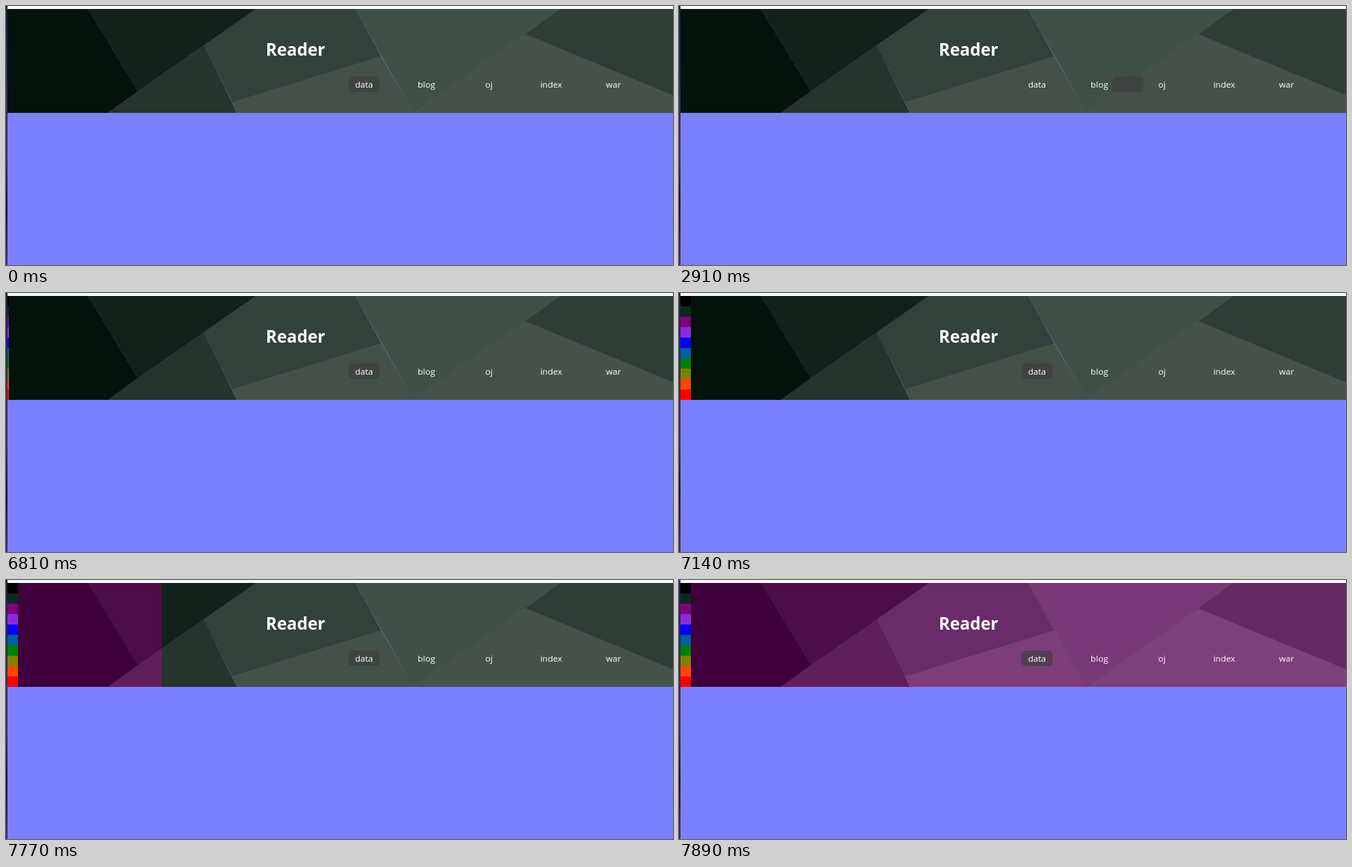
An HTML page for the animation above (8000 ms loop, 896x349 px).

```html
<!DOCTYPE html>
<html lang="en">
<head>
<meta charset="utf-8">
<title>Reader</title>
<style>
  html, body { margin: 0; width: 100%; height: 100%; overflow: hidden; background: #7b80ff; }
  svg { display: block; }
  text { fill: #fff; font-family: "Open Sans", "Noto Sans", sans-serif; }
  .title { font-size: 22.6px; font-weight: 700; }
  .nav { font-size: 11.6px; text-anchor: middle; }
</style>
</head>
<body>
<svg id="stage" width="896" height="349" viewBox="0 0 896 349">
  <defs>
    <linearGradient id="edge" x2="0" y2="1">
      <stop offset="0" stop-color="#182048"/>
      <stop offset=".4" stop-color="#3a2c56"/>
      <stop offset=".6" stop-color="#35305f"/>
      <stop offset=".77" stop-color="#17152c"/>
      <stop offset="1" stop-color="#3c3468"/>
    </linearGradient>
    <clipPath id="header"><rect x="2" y="4" width="894" height="140"/></clipPath>
    <clipPath id="sweep"><rect id="wipe" x="2" y="4" width="0" height="140"/></clipPath>
  </defs>
  <rect width="896" height="349" fill="#7b80ff"/>
  <rect id="top" width="896" height="4" fill="#f5fff8"/>
  <g clip-path="url(#header)"><g id="green"></g></g>
  <g clip-path="url(#sweep)"><g id="purple"></g></g>
  <rect id="pill" y="95" width="42" height="21" rx="6" fill="rgba(62,62,62,.67)"/>
  <text class="title" x="349" y="67">Reader</text>
  <g id="links"></g>
  <g id="swatches"></g>
  <rect width="2" height="349" fill="url(#edge)"/>
</svg>
<script>
const $ = id => document.getElementById(id);

function add(parent, tag, attrs, text = '') {
  const el = document.createElementNS('http://www.w3.org/2000/svg', tag);
  for (const key in attrs) el.setAttribute(key, attrs[key]);
  el.textContent = text;
  parent.append(el);
  return el;
}

// outline, green colour, purple colour
const facets = [
  ['2,4 110,4 177,115 137,144 2,144', '#03120b', '#3f003d'],
  ['110,4 336,4 177,115', '#12211a', '#4c0d4a'],
  ['177,115 266,53 310,144 137,144', '#25342c', '#5e1f5c'],
  ['266,53 336,4 469,4 504,68 304,130', '#32423a', '#6a2c69'],
  ['304,130 504,68 548,144 310,144', '#435149', '#7d3d7b'],
  ['469,4 745,4 698,38 548,144', '#3f5047', '#793878'],
  ['698,38 896,120 896,144 548,144', '#445249', '#7e3f7d'],
  ['745,4 896,4 896,120 698,38', '#2e3d35', '#672966']
];
for (const [points, green, purple] of facets) {
  add($('green'), 'polygon', { points, fill: green, stroke: green, 'stroke-width': .5 });
  add($('purple'), 'polygon', { points, fill: purple, stroke: purple, 'stroke-width': .5 });
}

['data', 'blog', 'oj', 'index', 'war'].forEach((word, i) =>
  add($('links'), 'text', { class: 'nav', x: 481 + i * 83.8, y: 110 }, word));

const colours = ['#000', '#0c2820', '#800080', '#8a2be2', '#00f',
  '#005fa0', '#008000', '#808000', '#ff4500', '#f00'];
const swatches = colours.map((fill, i) =>
  add($('swatches'), 'rect', { x: 2, y: 4 + i * 14, width: 0, height: 14, fill }));

const LOOP = 8000, TICK = 30;
const easeOut = p => 1 - (1 - p) ** 1.7;
const linear = p => p;

// each step: start, end, value at start, value at end, easing
const pillSteps = [
  [0, 0, 460, 460, linear],
  [1200, 1320, 505, 557, easeOut],
  [2910, 3030, 582, 640, easeOut],
  [4110, 4230, 683, 726, easeOut],
  [6810, 6810, 460, 460, linear]
];
const swatchSteps = [
  [0, 0, 0, 0, linear],
  [6810, 7140, 2, 14, easeOut]
];
const wipeSteps = [
  [0, 0, 2, 2, linear],
  [7710, 7740, 20, 52, linear],
  [7740, 7830, 52, 608, p => p ** 1.15],
  [7830, 7890, 608, 896, p => 1 - (1 - p) ** 1.3]
];

function valueAt(steps, t) {
  const [start, end, from, to, ease] = steps.filter(s => s[0] <= t).pop();
  const p = end > start ? Math.min(1, (t - start) / (end - start)) : 1;
  return Math.round(from + (to - from) * ease(p));
}

function draw(now) {
  const t = Math.floor(now % LOOP / TICK) * TICK;
  $('pill').setAttribute('x', valueAt(pillSteps, t));
  const width = valueAt(swatchSteps, t);
  swatches.forEach(s => s.setAttribute('width', width));
  $('wipe').setAttribute('width', valueAt(wipeSteps, t) - 2);
  $('top').setAttribute('fill', t < 7800 ? '#f5fff8' : '#fff');
}

const begin = performance.now();
function loop() {
  draw(performance.now() - begin);
  requestAnimationFrame(loop);
}
loop();
</script>
</body>
</html>
```
